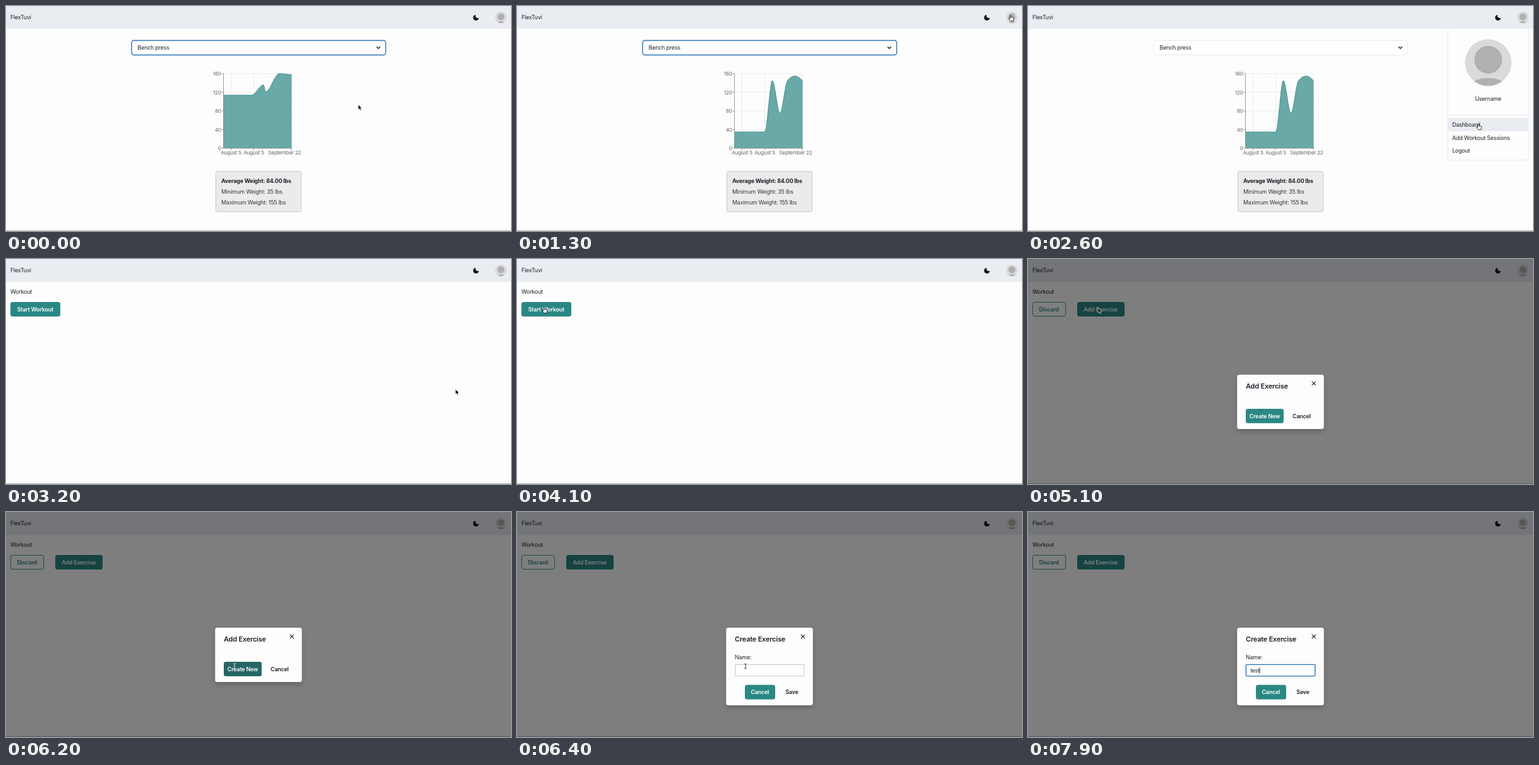
Recreate the animation shown at these times as an HTML page. Size 800 by 356 pixels, loop 8000 ms.

```html
<!DOCTYPE html>
<html lang="en">
<head>
<meta charset="utf-8">
<title>Workout tracker</title>
<style>
  html, body { margin: 0; width: 100%; height: 100%; overflow: hidden; background: #fdfdfd; }
  svg { display: block; width: 800px; height: 356px; }
  text { font: 400 8.9px Inter, "Open Sans", sans-serif; letter-spacing: -.02em; fill: #1d2129; white-space: pre; }
  .bold { font-weight: 700; }
  .semi { font-weight: 600; }
  .mid { text-anchor: middle; }
  .light { fill: #fff; }
  .teal { fill: #2a8884; }
  .title { font-size: 11px; font-weight: 600; }
  .tick { font-size: 8.1px; fill: #666; }
  .end { text-anchor: end; }
  .stat { fill: #34373c; }
  .hover { fill: #276665; opacity: 0; }
  .line { fill: none; stroke: #1d2129; stroke-linecap: round; stroke-linejoin: round; }
</style>
</head>
<body>
<svg viewBox="0 0 800 356" xmlns="http://www.w3.org/2000/svg">
  <defs>
    <clipPath id="round"><circle r="37"/></clipPath>
    <g id="avatar" clip-path="url(#round)">
      <circle r="37" fill="#dadada"/>
      <circle cy="-4.5" r="22" fill="#b0b0b0"/>
      <ellipse cy="38" rx="29" ry="13.5" fill="#b0b0b0"/>
    </g>
    <filter id="shadow" x="-20%" y="-20%" width="140%" height="150%">
      <feDropShadow dx="0" dy="4" stdDeviation="4" flood-opacity=".2"/>
    </filter>
    <filter id="soft" x="-10%" y="-10%" width="120%" height="120%">
      <feDropShadow dx="0" dy="1" stdDeviation="1" flood-opacity=".06"/>
    </filter>
  </defs>

  <rect width="800" height="356" fill="#fdfdfd"/>
  <rect width="800" height="36" fill="#e9ecf1"/>
  <rect y="355" width="800" height="1" fill="#b4b4b4"/>
  <text x="7" y="21.2">FlexTuvi</text>
  <path transform="translate(740 13.1) scale(.41)" d="M22 14A9 9 0 0 1 10 2 11 11 0 1 0 22 14Z" fill="#15181e"/>
  <use href="#avatar" transform="translate(784 18) scale(.25)"/>

  <g id="dashboard">
    <rect id="select" x="199" y="54.5" width="402.5" height="23" rx="3.5" fill="#fff"/>
    <text x="208.5" y="69.2">Bench press</text>
    <path class="line" d="M587.4 64.8l2.5 2.5 2.5-2.5" stroke-width="1.4"/>
    <g id="grid" fill="none" stroke="#ccc" stroke-width=".7" stroke-dasharray="1.8 1.8"></g>
    <path id="area" fill="#2c8683" fill-opacity=".7"/>
    <path id="curve" fill="none" stroke="#2c8683" stroke-width=".8"/>
    <g id="axes" fill="none" stroke="#777" stroke-width=".7"></g>
    <text class="tick mid" x="356.6" y="235">August 5</text>
    <text class="tick mid" x="392.6" y="235">August 5</text>
    <text class="tick mid" x="441.4" y="235">September 22</text>
    <rect x="332.5" y="261.5" width="135" height="64" rx="2.5" fill="#ebebeb" stroke="#c9c9c9"/>
    <text class="bold" x="341" y="280.3">Average Weight: 84.00 lbs</text>
    <text class="stat" x="341" y="297">Minimum Weight: 35 lbs</text>
    <text class="stat" x="341" y="313.6">Maximum Weight: 155 lbs</text>
  </g>

  <g id="workout">
    <text x="7" y="55.3">Workout</text>
    <g id="idle">
      <rect x="7" y="68" width="79" height="23" rx="3.5" class="teal"/>
      <rect id="startHover" x="7" y="68" width="79" height="23" rx="3.5" class="hover"/>
      <text class="semi light mid" x="46.3" y="83">Start Workout</text>
    </g>
    <g id="active">
      <rect x="7.4" y="68.4" width="52.2" height="22.2" rx="3.3" fill="none" stroke="#2a8884" stroke-width=".9"/>
      <text class="semi teal mid" x="33.2" y="83">Discard</text>
      <rect x="78" y="68" width="75" height="23" rx="3.5" class="teal"/>
      <rect id="addHover" x="78" y="68" width="75" height="23" rx="3.5" class="hover"/>
      <text class="semi light mid" x="115.2" y="83">Add Exercise</text>
    </g>
  </g>

  <g id="menu">
    <rect x="665.3" y="35.3" width="127.5" height="208.5" rx="3" fill="#fdfdfd" stroke="#e2e5ea" stroke-width=".7" filter="url(#soft)"/>
    <use href="#avatar" transform="translate(729 89.5)"/>
    <text class="mid" x="729" y="150.2">Username</text>
    <path d="M665.5 172.3H792.6" stroke="#e2e5ea" stroke-width=".7"/>
    <rect id="item" x="665.6" y="177.5" width="127" height="20.6" fill="#e9ecf1"/>
    <text x="672" y="191">Dashboard</text>
    <text x="672" y="211.7">Add Workout Sessions</text>
    <text x="672" y="232.3">Logout</text>
  </g>

  <rect id="overlay" width="800" height="356"/>

  <g id="addModal">
    <rect x="331.3" y="183" width="137.4" height="86" rx="3.5" fill="#fdfdfd" filter="url(#shadow)"/>
    <text class="title" x="345" y="205">Add Exercise</text>
    <path class="line" d="M450 194.2l5.4 5.4m0-5.4l-5.4 5.4" stroke-width="1.1"/>
    <rect x="345" y="237" width="60" height="22.8" rx="3.5" class="teal"/>
    <rect id="newHover" x="345" y="237" width="60" height="22.8" rx="3.5" class="hover"/>
    <text class="semi light mid" x="375" y="251.6">Create New</text>
    <text class="semi mid" x="433.4" y="251.6">Cancel</text>
  </g>

  <g id="newModal">
    <rect x="331.3" y="183" width="137.4" height="122.8" rx="3.5" fill="#fdfdfd" filter="url(#shadow)"/>
    <text class="title" x="345" y="205">Create Exercise</text>
    <path class="line" d="M450 194.2l5.4 5.4m0-5.4l-5.4 5.4" stroke-width="1.1"/>
    <text x="345" y="233.3">Name:</text>
    <rect id="input" x="345.4" y="241.4" width="109.4" height="18.2" fill="#fdfdfd"/>
    <text id="typed" x="352.2" y="253.8" style="font-size:8.6px"></text>
    <rect id="caret" y="246" width=".8" height="9.4"/>
    <rect x="361" y="273.5" width="48" height="23" rx="3.5" class="teal"/>
    <text class="semi light mid" x="384.8" y="288.3">Cancel</text>
    <text class="semi mid" x="435.4" y="288.3">Save</text>
  </g>

  <g id="cursor" stroke-linejoin="round">
    <path id="arrow" d="M0 0V8.2L1.9 6.5 3.2 9.4 4.6 8.8 3.4 6H5.9Z" fill="#000" stroke="#fff" stroke-width=".7"/>
    <path id="hand" d="M0 .9Q.8-.2 1.6.9V3.7L5.2 4.4Q6.2 4.7 6 5.9L5.2 9.6H.9L-1.9 6.1Q-2 4.9-.8 5.3L0 6Z" fill="#fff" stroke="#000" stroke-width=".8"/>
    <g id="beam" fill="none">
      <path d="M-1.8 0Q0 0 0 1.2 0 0 1.8 0M0 1V7M-1.8 8Q0 8 0 6.8 0 8 1.8 8" stroke="#fff" stroke-width="1.7"/>
      <path id="beamCore" d="M-1.8 0Q0 0 0 1.2 0 0 1.8 0M0 1V7M-1.8 8Q0 8 0 6.8 0 8 1.8 8" stroke-width=".8"/>
    </g>
  </g>
</svg>

<script>
const LOOP = 8000;
const $ = id => document.getElementById(id);
const set = (id, attrs) => { for (const k in attrs) $(id).setAttribute(k, attrs[k]); };
const show = (id, on) => { $(id).style.display = on ? '' : 'none'; };
const lerp = (a, b, p) => a + (b - a) * p;
const clamp = p => Math.max(0, Math.min(1, p));
const ramp = (t, start, ms) => clamp((t - start) / ms);
const easeOut = p => 1 - (1 - p) ** 3;
const easeBoth = p => p * p * (3 - 2 * p);
const last = (steps, t) => steps.filter(s => s[0] <= t).pop();

// Chart: x position and weight of each session, before and after the morph
const yOf = w => 225 - w * 118 / 160;
const startX = [344.5, 355, 366, 378, 389, 408, 411.2, 433, 443, 452.5];
const startW = [114, 114, 114, 114, 114, 136, 121, 160, 159, 157.5];
const endW = [35, 35, 35, 35, 35, 145, 75, 145, 155, 145];

let grid = '', axes = '<path d="M344.5 107V225H452.5"/>';
for (let w = 0; w <= 160; w += 40) {
  const y = yOf(w);
  grid += `<path d="M344.5 ${y}H452.5"/>`;
  axes += `<path d="M341.2 ${y}H344.5"/><text class="tick end" stroke="none" x="340.8" y="${y + 3}">${w}</text>`;
}
for (const x of [356.5, 392.5, 452.5]) {
  grid += `<path d="M${x} 107V225"/>`;
  axes += `<path d="M${x} 225V228.3"/>`;
}
$('grid').innerHTML = grid;
$('axes').innerHTML = axes;

// Monotone cubic through the points
function smooth(pts) {
  const n = pts.length - 1;
  const h = i => pts[i + 1][0] - pts[i][0];
  const s = i => (pts[i + 1][1] - pts[i][1]) / h(i);
  const m = pts.map((_, i) => {
    if (i === 0 || i === n) return 0;
    const a = s(i - 1), b = s(i);
    const mean = (a * h(i) + b * h(i - 1)) / (h(i - 1) + h(i));
    return (Math.sign(a) + Math.sign(b)) * Math.min(Math.abs(a), Math.abs(b), Math.abs(mean) / 2);
  });
  m[0] = (3 * s(0) - m[1]) / 2;
  m[n] = (3 * s(n - 1) - m[n - 1]) / 2;
  let d = `M${pts[0]}`;
  for (let i = 0; i < n; i++) {
    const [x, y] = pts[i], [u, v] = pts[i + 1], k = h(i) / 3;
    d += `C${x + k} ${y + k * m[i]} ${u - k} ${v - k * m[i + 1]} ${u} ${v}`;
  }
  return d;
}

// Pointer: time, x, y
const path = [
  [0, 558, 156], [100, 558, 156], [900, 739, 16], [1300, 781, 14], [2000, 782, 14],
  [2500, 712.5, 186], [2650, 712.5, 186], [2850, 712, 206], [3300, 712, 206],
  [4050, 42, 76], [4450, 42, 76], [4800, 111, 77], [5200, 111, 77], [5950, 362, 240], [8000, 362, 240.5]
];
const shapes = [
  [0, 'arrow'], [1200, 'hand'], [2100, 'arrow'], [2350, 'hand'], [3100, 'arrow'], [4060, 'hand'],
  [4420, 'arrow'], [4680, 'hand'], [4950, 'arrow'], [5850, 'hand'], [6150, 'beam'], [7300, '']
];
const typing = [[0, ''], [7300, 't'], [7400, 'te'], [7600, 'tes'], [7800, 'test']];

function pointer(t) {
  const i = path.findIndex(k => k[0] > t);
  const [t0, x0, y0] = path[i - 1], [t1, x1, y1] = path[i];
  const p = easeBoth(ramp(t, t0, t1 - t0));
  set('cursor', { transform: `translate(${lerp(x0, x1, p)} ${lerp(y0, y1, p)})` });
  const shape = last(shapes, t)[1];
  for (const id of ['arrow', 'hand', 'beam']) show(id, id === shape);
  set('beamCore', { stroke: t < 6300 ? '#276665' : '#111' });
}

// Fade and scale about a fixed point
function pop(id, p, from, x, y) {
  show(id, p > 0);
  const s = lerp(from, 1, p);
  set(id, { opacity: p, transform: `translate(${x} ${y}) scale(${s}) translate(${-x} ${-y})` });
}

function render(t) {
  const onDashboard = t < 3100;
  show('dashboard', onDashboard);
  show('workout', !onDashboard);
  show('idle', t < 4400);
  show('active', t >= 4400);

  if (onDashboard) {
    const p = easeOut(ramp(t, 0, 1200));
    const pts = startX.map((x, i) => [lerp(x, 344.5 + 12 * i, p), yOf(lerp(startW[i], endW[i], p))]);
    const d = smooth(pts);
    set('curve', { d });
    set('area', { d: d + 'V225H344.5Z' });
    const focus = t < 1900;
    set('select', { stroke: focus ? '#2e75b6' : '#e0e5ec', 'stroke-width': focus ? 1.4 : .8 });
  }

  pop('menu', easeOut(ramp(t, 1900, 200)) * (1 - ramp(t, 3000, 120)), .8, 793, 35);
  show('item', t >= 2350);
  set('item', { y: t < 2750 ? 177.5 : 198.1 });

  $('startHover').style.opacity = ramp(t, 4110, 200);
  $('addHover').style.opacity = ramp(t, 4650, 200) * (1 - ramp(t, 4950, 150));
  $('newHover').style.opacity = ramp(t, 5850, 200);

  set('overlay', { opacity: .5 * ramp(t, 4870, 200) });
  pop('addModal', t < 6300 ? easeOut(ramp(t, 4870, 200)) : 0, .95, 400, 226);
  pop('newModal', easeOut(ramp(t, 6250, 140)), .95, 400, 244);

  const focused = t >= 6700;
  set('input', { stroke: focused ? '#2e75b6' : '#bdbdbd', 'stroke-width': focused ? 1.4 : .8, rx: focused ? 1 : 0 });
  const word = last(typing, t)[1];
  $('typed').textContent = word;
  show('caret', focused && !(t >= 7100 && t < 7300));
  set('caret', { x: 352.2 + (word ? $('typed').getComputedTextLength() : 0) });

  pointer(t);
}

function tick() {
  render(performance.now() % LOOP);
  requestAnimationFrame(tick);
}
tick();
</script>
</body>
</html>
```
